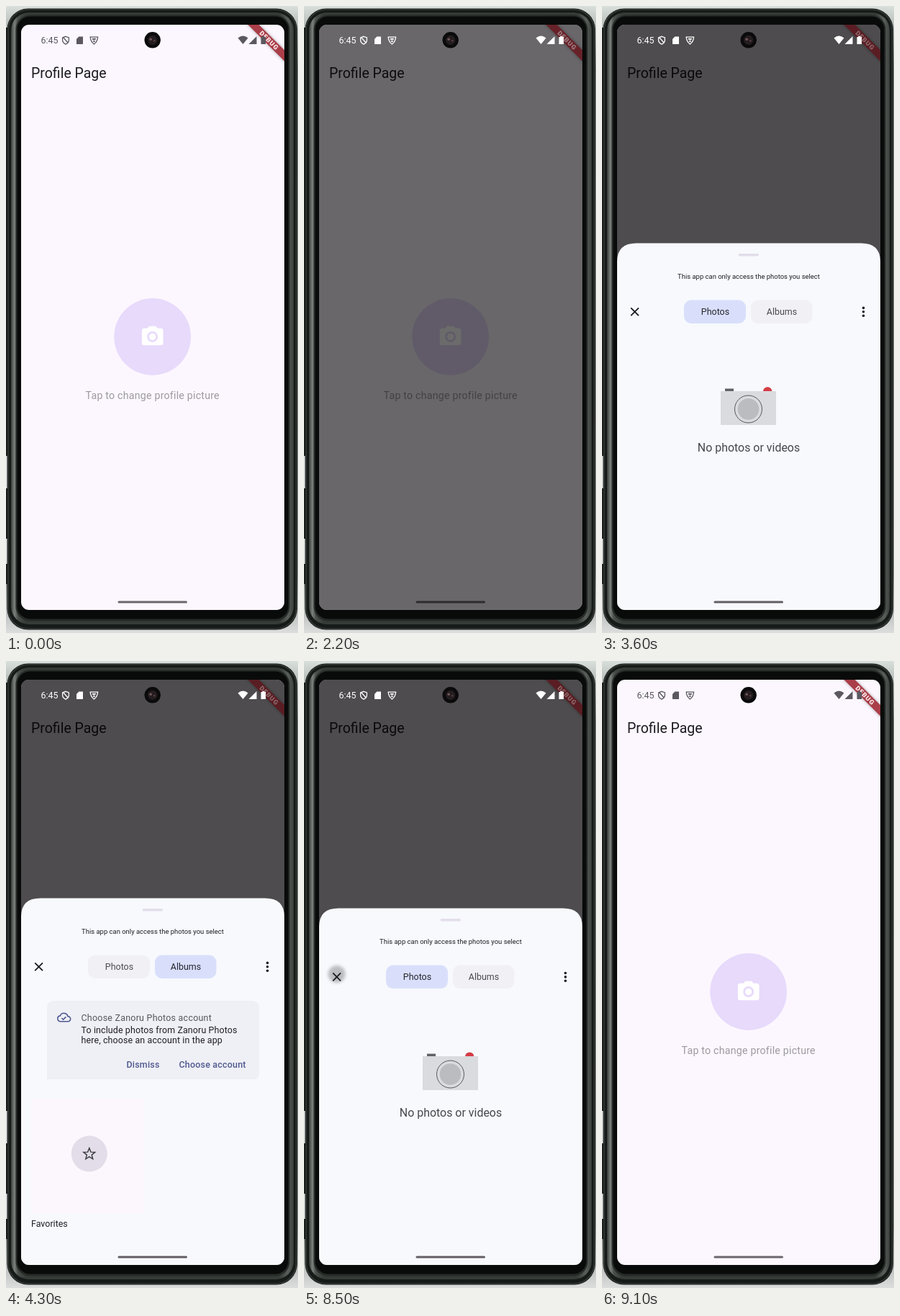
An HTML page for the animation above (9400 ms loop, 406 px wide and 871 px high).

```html
<!DOCTYPE html>
<html lang="en">
<head>
<meta charset="utf-8">
<title>Profile picture picker</title>
<style>
  html, body { margin: 0; width: 100%; height: 100%; overflow: hidden; background: #d9dddb; }
  svg { display: block; width: 100vw; height: 100vh; }
  text { font-family: Roboto, sans-serif; font-size: 12.46px; }
  .mid { text-anchor: middle; }
  .btn { font-weight: 500; letter-spacing: .2px; fill: #4f5a8e; }
</style>
</head>
<body>
<svg viewBox="0 0 406 871" preserveAspectRatio="none">
  <defs>
    <clipPath id="screen"><rect x="21" y="26" width="366" height="813" rx="11"/></clipPath>
    <linearGradient id="metal">
      <stop offset="0" stop-color="#3b403d"/>
      <stop offset=".012" stop-color="#7b807c"/>
      <stop offset=".024" stop-color="#4a4f4b"/>
      <stop offset=".05" stop-color="#353b37"/>
      <stop offset=".95" stop-color="#353b37"/>
      <stop offset=".98" stop-color="#5a5f5b"/>
      <stop offset="1" stop-color="#3b403d"/>
    </linearGradient>
    <linearGradient id="back" x2="0" y2="1">
      <stop offset="0" stop-color="#d9e0dc"/>
      <stop offset=".1" stop-color="#6c706e"/>
      <stop offset=".9" stop-color="#7d807e"/>
      <stop offset="1" stop-color="#dcdedd"/>
    </linearGradient>
    <filter id="soft" x="-50%" y="-50%" width="200%" height="200%"><feGaussianBlur stdDeviation="2.2"/></filter>
  </defs>

  <!-- phone body -->
  <rect width="406" height="871" fill="url(#back)"/>
  <path d="M0 30H3V625H0ZM0 670H3V740H0ZM0 775H3V803H0Z" fill="#1c1d1d"/>
  <path d="M0 625H3V670H0ZM0 740H3V775H0Z" fill="#e4e5e5"/>
  <rect x="1.5" y="3.5" width="403.5" height="863" rx="29" fill="#161a18"/>
  <rect x="3" y="5" width="400.5" height="860" rx="28" fill="none" stroke="#343a36" stroke-width="1.6"/>
  <rect x="7" y="9" width="393" height="850" rx="25" fill="url(#metal)"/>
  <rect x="13.5" y="12.5" width="381" height="842" rx="20" fill="#262b28"/>
  <rect x="15.5" y="14.5" width="377" height="837" rx="18" fill="#090b0a"/>

  <g clip-path="url(#screen)">
    <!-- profile page -->
    <rect x="21" y="26" width="366" height="813" fill="#fcf7fe"/>
    <text x="35" y="100" fill="#1d1b20" style="font-size:19.5px">Profile Page</text>
    <circle cx="203.7" cy="459.5" r="53.4" fill="#e7dafb"/>
    <g transform="translate(185.9 441.7) scale(1.483)" fill="#fff">
      <path d="M9 2L7.17 4H4c-1.1 0-2 .9-2 2v12c0 1.1.9 2 2 2h16c1.1 0 2-.9 2-2V6c0-1.1-.9-2-2-2h-3.17L15 2H9zm3 15c-2.76 0-5-2.24-5-5s2.24-5 5-5 5 2.24 5 5-2.24 5-5 5z"/>
      <circle cx="12" cy="12" r="3.2"/>
    </g>
    <text class="mid" x="203.7" y="546" fill="#9d9a9f" style="font-size:14.24px;letter-spacing:.2px">Tap to change profile picture</text>
    <rect x="155.5" y="826.5" width="96.5" height="3" rx="1.5" fill="#6b676d"/>
    <rect id="dim" x="21" y="26" width="366" height="813" fill="#000"/>

    <!-- corner ribbon -->
    <g transform="translate(387 26) rotate(45)">
      <rect x="-45" y="25" width="90" height="10.7" opacity=".35" filter="url(#soft)"/>
      <rect id="ribbon" x="-45" y="25" width="90" height="10.7"/>
      <text id="ribbonText" class="mid" x=".4" y="33.6" style="font-size:9.1px;font-weight:900;letter-spacing:.9px">DEBUG</text>
    </g>

    <!-- picker sheet -->
    <g id="sheet">
      <path d="M21 860V355Q21 329.5 48 329.5H360Q387 329.5 387 355V860Z" fill="#f7f9fd"/>
      <rect x="189.5" y="344" width="28.5" height="3.4" rx="1.7" fill="#e3deea"/>
      <text class="mid" x="204" y="379.3" fill="#1f1f22" style="font-size:9.46px">This app can only access the photos you select</text>
      <circle id="ripple" cx="45.5" cy="421" fill="#000" filter="url(#soft)"/>
      <path d="M40.2 419.4l10.8 10.8m0-10.8l-10.8 10.8" stroke="#1b1b1e" stroke-width="1.8"/>
      <g fill="#1b1b1e"><circle cx="363.5" cy="419.4" r="1.8"/><circle cx="363.5" cy="424.8" r="1.8"/><circle cx="363.5" cy="430.2" r="1.8"/></g>
      <rect id="pill0" x="114" y="408.5" width="86" height="32.5" rx="10"/>
      <rect id="pill1" x="207" y="408.5" width="85.5" height="32.5" rx="10"/>
      <text id="tab0" class="mid" x="157.5" y="429.3">Photos</text>
      <text id="tab1" class="mid" x="250" y="429.3">Albums</text>

      <g id="page0">
        <rect x="171" y="531.5" width="12" height="4" fill="#5f6368"/>
        <path d="M224 535.5a6.2 6.2 0 0 1 12.4 0Z" fill="#d43c47"/>
        <rect x="165" y="535" width="77" height="47" fill="#dadbde"/>
        <circle cx="203.5" cy="560" r="19" fill="none" stroke="#55585c"/>
        <circle cx="203.5" cy="560" r="14.8" fill="#bbbcbf"/>
        <text class="mid" x="204" y="618.7" fill="#47474b" style="font-size:15.95px">No photos or videos</text>
      </g>

      <g id="page1">
        <path d="M57 581V482Q57 472 67 472H342Q352 472 352 482V573Q352 581 344 581Z" fill="#efeff6"/>
        <g transform="translate(71 485.6) scale(.8)" fill="none" stroke="#4f5a8e" stroke-width="2">
          <path d="M6 19a5 5 0 0 1-.6-9.96A7 7 0 0 1 18.7 10 4.5 4.5 0 0 1 19 19Z"/>
          <path d="M8 13l2.7 2.7 4.8-4.8"/>
        </g>
        <text x="104.5" y="499.8" fill="#55555b" style="letter-spacing:.24px">Choose Zanoru Photos account</text>
        <g fill="#1f1f23" style="letter-spacing:.12px">
          <text x="104.5" y="517">To include photos from Zanoru Photos</text>
          <text x="104.5" y="531.3">here, choose an account in the app</text>
        </g>
        <text class="btn" x="167.5" y="565">Dismiss</text>
        <text class="btn" x="240.5" y="565">Choose account</text>
        <rect x="35" y="607" width="157" height="161" rx="4" fill="#fcf7fd"/>
        <circle cx="115.8" cy="684.5" r="25" fill="#e2dde8"/>
        <path id="star" fill="none" stroke="#38373c" stroke-width="1.4"/>
        <text x="35" y="786" fill="#1f1f23">Favorites</text>
      </g>
    </g>
    <rect id="bar" x="155.5" y="826.5" width="96.5" height="3" rx="1.5" fill="#625e64"/>

    <!-- status bar -->
    <g id="status">
      <text x="48.5" y="52">6:45</text>
      <path d="M83 42.3l4.4 1.6v3.6q0 3.6-4.4 5.6-4.4-2-4.4-5.6v-3.6ZM79.5 43.5l7 8" fill="none" stroke="currentColor" stroke-width="1.3"/>
      <path d="M101.3 42.5H107V53H98V46Z"/>
      <path d="M117.2 43.2H127.6Q127.4 49 122.4 53 117.4 49 117.2 43.2Z" fill="none" stroke="currentColor" stroke-width="1.3"/>
      <path d="M119.6 45h5.6l-1 2h-3.6ZM120.6 48h3.6l-1.8 2.8Z"/>
      <path d="M329.5 53L322.5 44.6Q329.5 38.6 336.5 44.6Z"/>
      <path d="M348.5 42V53H337.5Z"/>
      <path d="M356.2 41.8h3v1.3h1.9V53h-6.6v-9.9h1.7Z"/>
    </g>
    <circle cx="203.7" cy="47.3" r="11.2" fill="#0b0a0b"/>
    <circle cx="203.7" cy="47.3" r="6.6" fill="#241d20"/>
    <circle cx="201.2" cy="46.3" r="1.8" fill="#6e5555"/>
    <circle cx="206.3" cy="48.3" r="1.3" fill="#583f44"/>
  </g>
</svg>
<script>
  const LOOP = 9400, STEP = 100, WIDTH = 366, DROP = 510, DARK = .69;
  const $ = id => document.getElementById(id);
  const set = (id, name, value) => $(id).setAttribute(name, value);
  const part = (t, start, length) => Math.min(1, Math.max(0, (t - start) / length));
  const easeOut = p => 1 - (1 - p) ** 3;
  const easeBoth = p => p < .5 ? 2 * p * p : 1 - 2 * (1 - p) ** 2;
  const mix = (a, b, k) => `rgb(${a.map((v, i) => Math.round(v + (b[i] - v) * k))})`;
  const slide = (id, x, y) => set(id, 'transform', `translate(${x} ${y})`);

  set('star', 'd', 'M' + Array.from({ length: 10 }, (_, i) => {
    const r = i % 2 ? 3.6 : 8.4, a = i * Math.PI / 5;
    return `${115.8 + r * Math.sin(a)} ${685 - r * Math.cos(a)}`;
  }).join('L') + 'Z');

  function dimAt(t) {
    if (t < 2200) return 0;
    if (t < 2300) return .58;
    return DARK * (1 - part(t, 8700, 400));
  }

  function pageAt(t) {
    // the pager has just begun to move when a tab is pressed
    return t < 7000 ? easeOut(part(t, 3799.5, 500)) : 1 - easeOut(part(t, 7099.5, 500));
  }

  function draw(t) {
    const dim = dimAt(t), k = dim / DARK;
    set('dim', 'opacity', dim);
    set('ribbon', 'fill', mix([170, 62, 73], [90, 29, 35], k));
    set('ribbonText', 'fill', mix([252, 238, 240], [142, 106, 109], k));
    const ink = dim > .3 ? '#fff' : '#5b585f';
    set('status', 'fill', ink);
    set('status', 'color', ink);

    const opened = easeOut(part(t, 2200, 400));
    const closed = easeBoth(part(t, 8453, 400));
    const drop = DROP * (1 - opened + closed);
    slide('sheet', 0, drop);
    set('bar', 'opacity', drop < 490 ? 1 : 0);

    const page = pageAt(t);
    slide('page0', -WIDTH * page, 0);
    slide('page1', WIDTH * (1 - page), 0);
    const chosen = t >= 3900 && t < 7200 ? 1 : 0;
    const pressed = t === 3800 ? 1 : t === 7100 ? 0 : -1;
    for (const i of [0, 1]) {
      set('pill' + i, 'fill', i === chosen ? '#d9dffb' : '#f1f0f5');
      const strong = pressed < 0 ? i === chosen : i === pressed;
      set('tab' + i, 'fill', strong ? '#24262f' : '#4b4b51');
    }

    set('ripple', 'r', t < 8500 ? 8 : 12);
    set('ripple', 'opacity', t >= 8400 && t < 8700 ? .24 : 0);
  }

  function tick(now) {
    draw(Math.floor(now % LOOP / STEP) * STEP);
    requestAnimationFrame(tick);
  }
  draw(0);
  requestAnimationFrame(tick);
</script>
</body>
</html>
```
